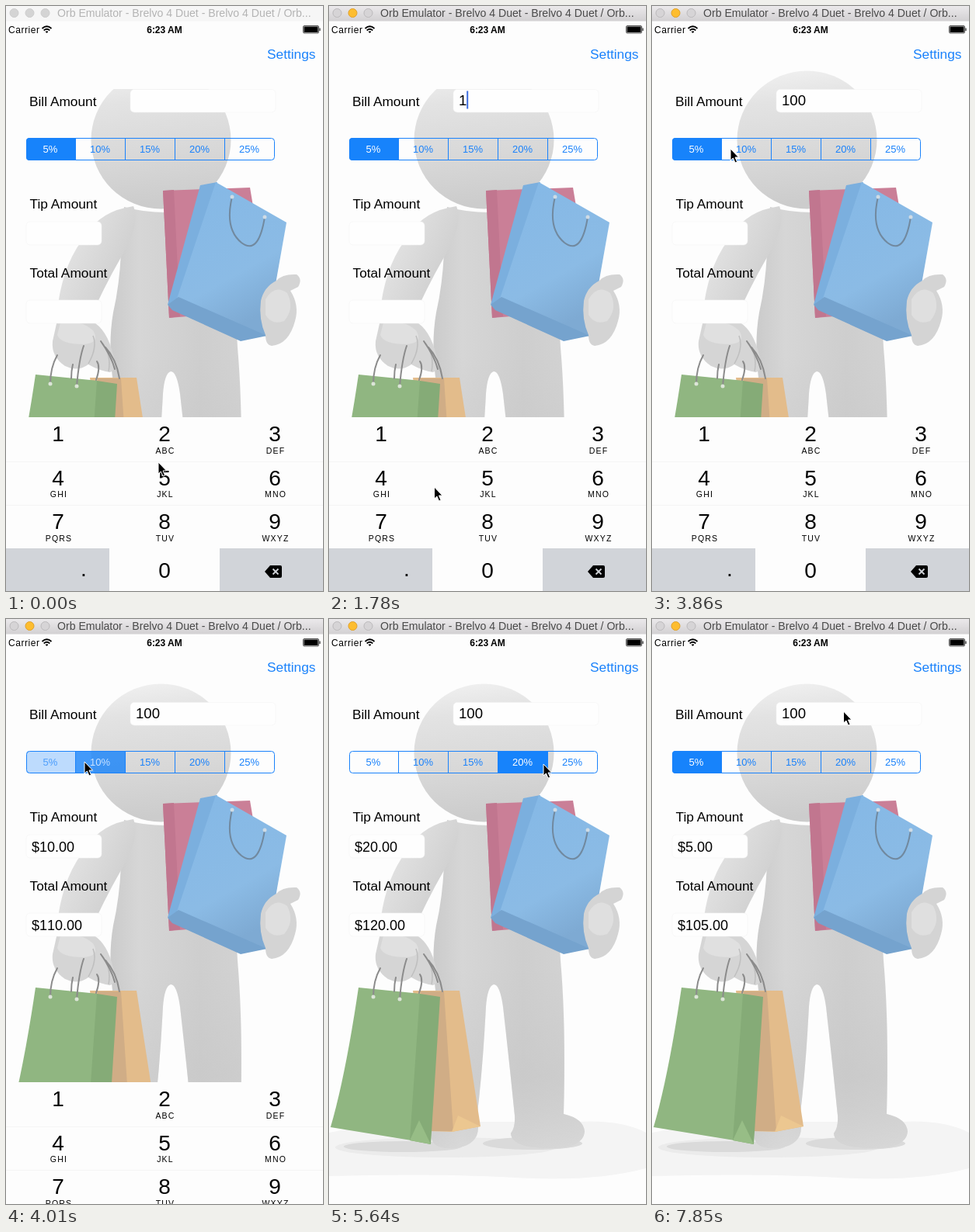
An HTML page that plays this animation: 408 by 754 pixels, repeating every 8 s.

```html
<!DOCTYPE html>
<html lang="en">
<head>
<meta charset="utf-8">
<title>Tip calculator</title>
<style>
  html, body { margin: 0; width: 100%; height: 100%; overflow: hidden; background: #fdfdfd; }
  svg { display: block; width: 408px; height: 754px; }
  text { font-family: "Liberation Sans", Arial, sans-serif; font-size: 17.3px; white-space: pre; }
  .mid { text-anchor: middle; }
  .blue { fill: #1a82fb; }
  .money { font-size: 18px; font-kerning: none; }
  .digit { font-size: 28px; }
  .letters { font-size: 10.5px; letter-spacing: 1.2px; }
  .seg { font-size: 13px; }
  .field { fill: #fefefe; stroke: #f0f0f0; stroke-width: .5; }
  .cord { fill: none; stroke: #8b8b8b; stroke-width: 2; stroke-linecap: round; }
</style>
</head>
<body>
<svg viewBox="0 0 408 754">
  <defs>
    <linearGradient id="headFill" x2=".12" y2="1">
      <stop offset="0" stop-color="#f2f2f2"/><stop offset=".25" stop-color="#e3e3e3"/>
      <stop offset=".65" stop-color="#d8d8d8"/><stop offset="1" stop-color="#cccccc"/>
    </linearGradient>
    <linearGradient id="bodyFill">
      <stop offset="0" stop-color="#cacaca"/><stop offset=".2" stop-color="#d6d6d6"/>
      <stop offset=".6" stop-color="#cecece"/><stop offset="1" stop-color="#d4d4d4"/>
    </linearGradient>
    <linearGradient id="legShade" x2="0" y2="1">
      <stop offset="0" stop-color="#c4c4c4" stop-opacity="0"/><stop offset=".6" stop-color="#c4c4c4" stop-opacity=".4"/>
      <stop offset="1" stop-color="#dadada" stop-opacity=".6"/>
    </linearGradient>
    <linearGradient id="armFill" x1=".2" x2=".9" y2=".5">
      <stop offset="0" stop-color="#e6e6e6"/><stop offset="1" stop-color="#cfcfcf"/>
    </linearGradient>
    <linearGradient id="blueBag" x2=".4" y2="1">
      <stop offset="0" stop-color="#84b8e6"/><stop offset=".7" stop-color="#8bbbe5"/><stop offset="1" stop-color="#7eaad3"/>
    </linearGradient>
    <linearGradient id="bar" x2="0" y2="1">
      <stop offset="0" stop-color="#ebe9eb"/><stop offset="1" stop-color="#d2d0d2"/>
    </linearGradient>
  </defs>
  <rect width="408" height="754" fill="#fdfdfd"/>

  <g id="shopper">
    <path d="M0 662Q60 650 150 648H320Q375 645 408 662V708Q340 726 240 720T0 718Z" fill="#f4f4f4"/>
    <ellipse cx="150" cy="681" rx="142" ry="13" fill="#ebebeb"/>
    <ellipse cx="95" cy="680" rx="76" ry="7" fill="#dadada"/>
    <ellipse cx="262" cy="676" rx="64" ry="8" fill="#dadada"/>
    <path fill="url(#bodyFill)" d="M152 259Q200 272 250 261Q285 270 292 330L298 440Q305 520 302 638
      Q328 644 329 661Q327 682 285 682Q235 682 234 663Q240 655 239 640Q232 570 224 500Q220 471 212 471Q204 473 202 500Q198 580 190 645
      Q194 655 190 666Q182 682 156 682Q128 682 132 660L148 640Q149 560 140 500Q130 440 138 395Q146 360 148 318Z"/>
    <path fill="url(#legShade)" d="M137 450H299Q305 520 302 638Q328 644 329 661Q327 682 285 682Q235 682 234 663
      Q240 655 239 640Q232 570 224 500Q220 471 212 471Q204 473 202 500Q198 580 190 645Q194 655 190 666Q182 682 156 682Q128 682 132 660L148 640Q149 560 140 500Z"/>
    <path fill="url(#armFill)" d="M164 258Q122 264 104 294Q75 328 67 384L66 412H104Q126 362 148 324Q174 280 164 258Z"/>
    <path fill="#d5d5d5" d="M66 405Q88 400 110 406Q130 416 138 450Q144 468 134 472Q120 470 106 462Q92 472 76 464Q58 452 60 432Z"/>
    <path fill="#e0e0e0" d="M70 408Q96 404 112 418Q122 434 100 436Q70 436 66 424Z"/>
    <path d="M106 461Q118 440 112 425M132 471Q136 450 124 434" fill="none" stroke="#bfbfbf" stroke-width="1.5"/>
    <ellipse cx="199.500" cy="172.500" rx="90" ry="89" fill="url(#headFill)"/>

    <path fill="#ca7f97" d="M202 238L314 234L330 330L260 398L210 402Z"/>
    <path fill="#c1768f" d="M202 238L216 237L224 400L210 402Z"/>
    <path fill="#7bafde" d="M250 231L272 227L222 378L208 385Z"/>
    <path fill="url(#blueBag)" d="M270 227L361 279L335 426L220 377Z"/>
    <path fill="#75a3ce" d="M208 385L222 375L336 425L302 432L214 392Z"/>
    <path class="cord" d="M291 246Q281 287 303 305Q325 322 333 272" style="stroke:#71899f"/>
    <circle cx="291" cy="246" r="2.500" fill="#cfdbe5"/><circle cx="333" cy="272" r="2.500" fill="#cfdbe5"/>
    <path fill="#d4d4d4" d="M328 380Q332 362 348 354Q356 345 374 346Q382 352 376 362L366 367Q378 386 372 406Q364 436 342 438Q334 437 334 424Q325 404 328 380Z"/>
    <path fill="#dfdfdf" d="M334 378Q346 358 362 370Q372 390 358 406Q342 412 334 398Z"/>

    <path fill="#e3bc8b" d="M108 479L168 479L195 654L158 661L128 660Z"/>
    <path fill="#d0ad86" d="M118 480H148L160 660H126Z"/>
    <path fill="#ecc790" d="M158 661L166 640L195 654Z"/>
    <path fill="#90b681" d="M38 475L118 483L106 672L2 655Q21 590 38 475Z"/>
    <path fill="#85ab77" d="M117 483L143 487L131 677L104 672Z"/>
    <path fill="#97bd86" d="M104 672L116 646L131 677Z"/>
    <path class="cord" d="M57 487Q57 466 66 450M91 490Q94 455 100 438M84 480Q84 470 86 462M116 482Q122 465 117 458M128 440Q142 455 146 480M122 432Q136 452 140 468"/>
    <circle cx="57" cy="487" r="2.500" fill="#dce5d8"/><circle cx="91" cy="490" r="2.500" fill="#dce5d8"/>
  </g>
  <rect id="veil" x="100" y="80" width="200" height="27" fill="#fdfdfd"/>

  <text x="3" y="35" style="font-size:12px;letter-spacing:.55px">Carrier</text>
  <g fill="none" stroke="#000" stroke-width="1.700">
    <path d="M46.500 29Q52.500 23.500 58.500 29M48.700 31.500Q52.500 28 56.300 31.500"/>
    <path d="M51 33L52.500 34.500L54 33Z" fill="#000" stroke-width="1"/>
  </g>
  <text class="mid" x="204" y="35" style="font-size:12px;font-weight:bold">6:23 AM</text>
  <rect x="382.500" y="25.500" width="20" height="9.500" rx="1.500" fill="none" stroke="#000" stroke-width=".7"/>
  <path d="M383.500 26.500H401.500V34H383.500ZM403.500 28.500H404.500V32H403.500Z"/>
  <text class="blue" x="336" y="68">Settings</text>

  <text x="30" y="129">Bill Amount</text>
  <text x="30.500" y="261">Tip Amount</text>
  <text x="30.500" y="350">Total Amount</text>
  <rect class="field" x="160" y="107.500" width="187" height="29.500" rx="5"/>
  <rect class="field" x="26" y="278" width="97" height="30" rx="5"/>
  <rect class="field" x="26" y="379" width="97" height="30" rx="5"/>
  <text id="bill" x="167" y="128" style="font-size:18.6px"></text>
  <rect id="caret" y="109.500" width="2" height="23" fill="#3f6fe0"/>
  <text id="tip" class="money" x="33" y="299.500"></text>
  <text id="total" class="money" x="33" y="400.500"></text>

  <clipPath id="pill"><rect x="26" y="170" width="320" height="29" rx="4"/></clipPath>
  <g id="segments" clip-path="url(#pill)"></g>
  <rect x="26.500" y="170.500" width="319" height="28" rx="4" fill="none" stroke="#1a82fb"/>

  <g id="keyboard">
    <rect y="530" width="408" height="224" fill="#fdfdfd"/>
    <path d="M0 587.500H408M0 643.500H408" stroke="#f5f5f5"/>
    <path d="M0 699H133V754H0ZM275 699H408V754H275Z" fill="#d1d4d9"/>
    <text class="digit mid" x="100" y="735">.</text>
    <path d="M333 729L340 721H353Q355 721 355 723V735Q355 737 353 737H340Z"/>
    <path d="M343.500 725.500L350.500 732.500M350.500 725.500L343.500 732.500" stroke="#d1d4d9" stroke-width="1.800"/>
  </g>

  <rect id="titleBar" width="408" height="19.500"/>
  <g id="lights">
    <circle cx="10.500" cy="9" r="5.500"/><circle cx="30.500" cy="9" r="5.500"/><circle cx="50.500" cy="9" r="5.500"/>
  </g>
  <text id="title" x="66" y="14" style="font-size:14.1px">Orb Emulator - Brelvo 4 Duet - Brelvo 4 Duet / Orb...</text>

  <path id="cursor" d="M0 0V15L3.400 12L6 18L8.600 17L6 11H10.500Z" stroke="#fff" stroke-width="1" stroke-linejoin="round"/>
</svg>
<script>
const LOOP = 8000, STEP = 148;
const RATES = [5, 10, 15, 20, 25];
const $ = id => document.getElementById(id);

function add(parent, tag, attrs, text = "") {
  const el = document.createElementNS("http://www.w3.org/2000/svg", tag);
  for (const key in attrs) el.setAttribute(key, attrs[key]);
  el.textContent = text;
  return parent.appendChild(el);
}

const segments = RATES.map((rate, i) => {
  const x = 26 + i * 64, mid = { x: x + 31, y: 189 };
  const fill = add($("segments"), "rect", { x, y: 170, width: 64, height: 29, fill: "#1783fb" });
  add($("segments"), "text", { ...mid, class: "seg mid blue" }, rate + "%");
  const label = add($("segments"), "text", { ...mid, class: "seg mid", fill: "#fff" }, rate + "%");
  if (i) add($("segments"), "path", { d: `M${x - .5} 170V199`, stroke: "#1a82fb" });
  return [fill, label];
});

["", "ABC", "DEF", "GHI", "JKL", "MNO", "PQRS", "TUV", "WXYZ"].forEach((letters, i) => {
  const x = [67, 204, 346][i % 3], y = 561 + Math.floor(i / 3) * 56.5;
  add($("keyboard"), "text", { x, y, class: "digit mid" }, i + 1);
  add($("keyboard"), "text", { x: x + 1, y: y + 15.5, class: "letters mid" }, letters);
});
add($("keyboard"), "text", { x: 204, y: 737, class: "digit mid" }, "0");

// Held values: [start ms, ...value]
const cursorTrack = [
  [0, 196, 588], [150, 158, 577], [300, 100, 560], [450, 64, 552],
  [1490, 72, 560], [1630, 98, 585], [1780, 135.5, 620], [1930, 157, 660],
  [2080, 186, 700], [2230, 201, 717], [2380, 206, 721],
  [3120, 76.5, 421], [3270, 42, 300], [3420, 31, 230], [3570, 58, 195], [3860, 101, 184],
  [4300, 150, 187], [4450, 178, 187.5], [4900, 218, 187], [5050, 242, 187],
  [5640, 276, 187], [5790, 303, 187], [6080, 180, 195], [6240, 68, 201], [6390, 65, 190], [6530, 63, 183],
  [7260, 68, 203], [7410, 100, 211], [7560, 160, 188], [7700, 216, 144], [7850, 246.5, 119]
];
const billTrack = [[0, ""], [1190, "1"], [2530, "10"], [2830, "100"]];
const caretTrack = [[0, 0], [300, 1], [890, 0], [1190, 1], [3420, 0]];
// Chosen rate, and how much of the previous one is left in the first step of the fade
const rateTrack = [[0, 0, 0], [4010, 1, .28], [4750, 2, .1], [5340, 3, .2], [5930, 4, .2], [6830, 0, .2]];
const slideTrack = [[0, 0], [4010, 67], [4160, 185], [4300, 224]];

const indexAt = (track, t) => track.findLastIndex(row => row[0] <= t);
const at = (track, t) => track[indexAt(track, t)];
const dollars = n => "$" + n.toFixed(2);

function drawTitle(active) {
  $("titleBar").setAttribute("fill", active ? "url(#bar)" : "#f6f6f6");
  $("title").setAttribute("fill", active ? "#4a4a4a" : "#b4b4b4");
  [...$("lights").children].forEach((dot, i) => {
    dot.setAttribute("fill", !active ? "#d4d4d4" : i === 1 ? "#fdbd2f" : "#d6d4d6");
    dot.setAttribute("stroke", !active ? "#cecece" : i === 1 ? "#e0a02a" : "#bcbabc");
  });
}

function drawSegments(t) {
  const i = indexAt(rateTrack, t), [start, chosen, left] = rateTrack[i];
  const rest = t - start < STEP ? left : 0;
  const previous = i ? rateTrack[i - 1][1] : -1;
  segments.forEach((parts, n) => {
    const level = n === chosen ? 1 - rest * .7 : n === previous ? rest : 0;
    parts.forEach(part => part.setAttribute("opacity", level));
  });
  return RATES[chosen];
}

function draw(t) {
  drawTitle(t >= 890);
  const rate = drawSegments(t);
  const [, x, y] = at(cursorTrack, t);
  $("cursor").setAttribute("transform", `translate(${x} ${y})`);
  const bill = at(billTrack, t)[1];
  $("bill").textContent = bill;
  $("caret").setAttribute("x", 167 + bill.length * 10.2);
  $("caret").setAttribute("opacity", at(caretTrack, t)[1]);
  $("keyboard").setAttribute("transform", `translate(0 ${at(slideTrack, t)[1]})`);
  const done = t >= 4010;
  $("tip").textContent = done ? dollars(rate) : "";
  $("total").textContent = done ? dollars(100 + rate) : "";
  $("veil").setAttribute("opacity", t < 3860 ? 1 : 0);
}

const origin = performance.now();
function tick() {
  draw((performance.now() - origin) % LOOP);
  requestAnimationFrame(tick);
}
tick();
</script>
</body>
</html>
```
